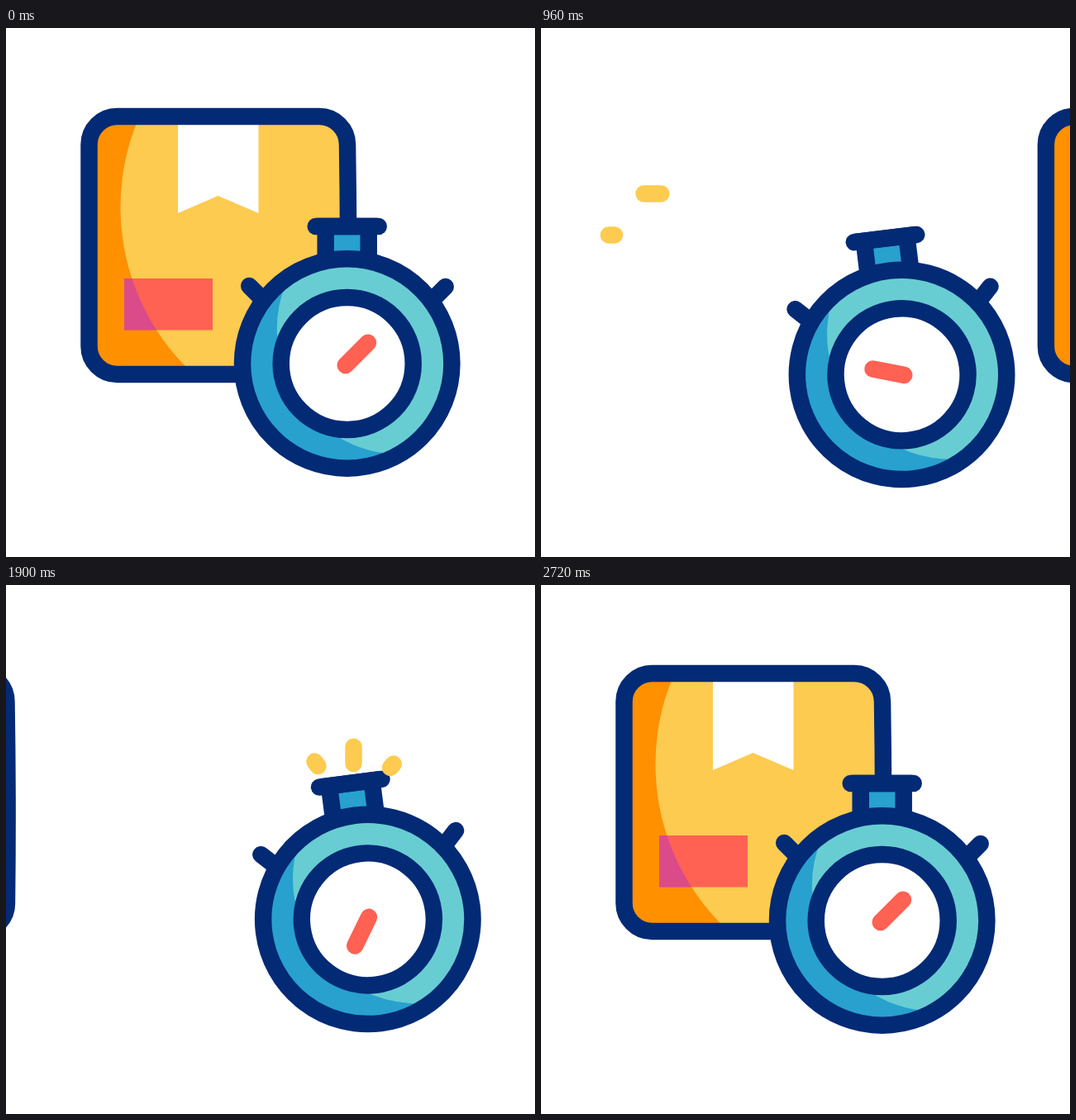
Write an HTML page that moves like this. It is 640 px wide and 640 px high and loops after 3280 ms.

```html
<!DOCTYPE html>
<html lang="en">
<head>
<meta charset="utf-8">
<title>Express parcel</title>
<style>
  html, body { margin: 0; height: 100%; overflow: hidden; background: #fff; }
  svg { display: block; width: 100vw; height: 100vh; }
  .ink { stroke: #032a75; }
  .ink, .dash, #hand { stroke-width: 20.5; stroke-linecap: round; }
  .dash { stroke: #fdcb50; }
  #hand { stroke: #ff6153; }
</style>
</head>
<body>
<svg viewBox="0 0 640 640" fill="none">
  <defs>
    <path id="shape" d="M134.500 107H379a34 34 0 0 1 34 34Q415 263 413.500 385a34 34 0 0 1-34 34H134.500a34 34 0 0 1-34-34V141a34 34 0 0 1 34-34Z"/>
    <path id="shade" d="M90 97H166A275 275 0 0 0 227 419L90 429Z"/>
    <clipPath id="inBox"><use href="#shape"/></clipPath>
    <clipPath id="inShade"><use href="#shade"/></clipPath>
    <clipPath id="inDial"><circle r="127"/></clipPath>
  </defs>

  <g id="box">
    <use href="#shape" fill="#fdcb50"/>
    <g clip-path="url(#inBox)">
      <use href="#shade" fill="#ff9000"/>
      <path d="M208 107H305.500V224L256.500 203L208 224Z" fill="#fff"/>
    </g>
    <path d="M143 303h107v62.500h-107Z" fill="#ff6153"/>
    <path d="M143 303h107v62.500h-107Z" fill="#db4b8a" clip-path="url(#inShade)"/>
    <use href="#shape" class="ink"/>
  </g>

  <line class="dash" id="trail1" x1="124.500" y1="200.500" y2="200.500"/>
  <line class="dash" id="trail2" x1="82" y1="250.500" y2="250.500"/>

  <g id="watch"><g transform="translate(412.700 406)">
    <g id="crown" class="ink">
      <path d="M-26 -166V-110H26V-166Z" fill="#28a1ce"/>
      <path d="M-38 -166H38"/>
    </g>
    <path class="ink" d="M-118.500 -94L-100 -75.500M119 -93L101 -75"/>
    <circle r="127" fill="#28a1ce"/>
    <circle cx="66" cy="-41" r="151" fill="#68cdd2" clip-path="url(#inDial)"/>
    <circle r="126.700" class="ink"/>
    <circle r="80" class="ink" fill="#fff"/>
    <path id="hand" d="M0 2.800V-35.700"/>
  </g></g>

  <g id="sparks"></g>
</svg>
<script>
const LOOP = 3280;
const $ = id => document.getElementById(id);
const progress = (t, from, to) => Math.min(1, Math.max(0, (t - from) / (to - from)));
const smooth = p => (1 - Math.cos(Math.PI * p)) / 2;

// keys: [time, value] pairs joined by smooth easing
function track(t, keys) {
  let value = keys[0][1];
  for (let i = 1; i < keys.length; i++) {
    const [from, a] = keys[i - 1], [to, b] = keys[i];
    if (t >= from) value = a + (b - a) * smooth(progress(t, from, to));
  }
  return value;
}

const SWAY = [[160, 0], [470, 5.1], [905, -7.3], [1400, 5.1], [1885, -7.3], [2473, 0]];
const HOP = [[160, 0], [445, -37], [690, 21], [1430, 0]];
const PRESS = [[400, 0], [530, 11], [660, 0]];
const LEAN = [[160, 0], [415, -5], [602, 0]];

// x, y of the inner end and the full reach of each spark
const SPARKS = [[377.5, 219, -6, -8], [420.5, 216, 0, -30], [465, 221, 5.5, -6.5]];
for (const s of SPARKS) {
  const path = document.createElementNS("http://www.w3.org/2000/svg", "path");
  path.setAttribute("class", "dash");
  $("sparks").append(path);
}

function boxShift(t) {
  if (t < 1500) return 560 * (1 - (1 - progress(t, 607, 1111)) ** 2);
  return -568 * (1 - progress(t, 1800, 2720)) ** 2.75;
}

function trail(line, t, length) {
  const size = length * Math.min(progress(t, 720, 840), 1 - progress(t, 840, 1025));
  line.setAttribute("x2", +line.getAttribute("x1") + size);
  line.style.display = size > 0 ? "" : "none";
}

function draw(t) {
  $("box").setAttribute("transform", `translate(${boxShift(t)} 0) rotate(${track(t, LEAN)} 201 531)`);
  $("watch").setAttribute("transform", `translate(0 ${track(t, HOP)}) rotate(${track(t, SWAY)} 412.7 208)`);
  $("crown").setAttribute("transform", `translate(0 ${track(t, PRESS)})`);
  $("hand").setAttribute("transform", `rotate(${45 + 720 * progress(t, 160, 2533)})`);
  trail($("trail1"), t, 60);
  trail($("trail2"), t, 20);

  const head = progress(t, 1820, 1940), tail = progress(t, 1940, 2060);
  $("sparks").style.display = head > 0 && tail < 1 ? "" : "none";
  SPARKS.forEach(([x, y, dx, dy], i) => $("sparks").children[i].setAttribute("d",
    `M${x + dx * tail} ${y + dy * tail}L${x + dx * head} ${y + dy * head}`));
}

const start = performance.now();
function frame() {
  draw((performance.now() - start) % LOOP);
  requestAnimationFrame(frame);
}
frame();
</script>
</body>
</html>
```
